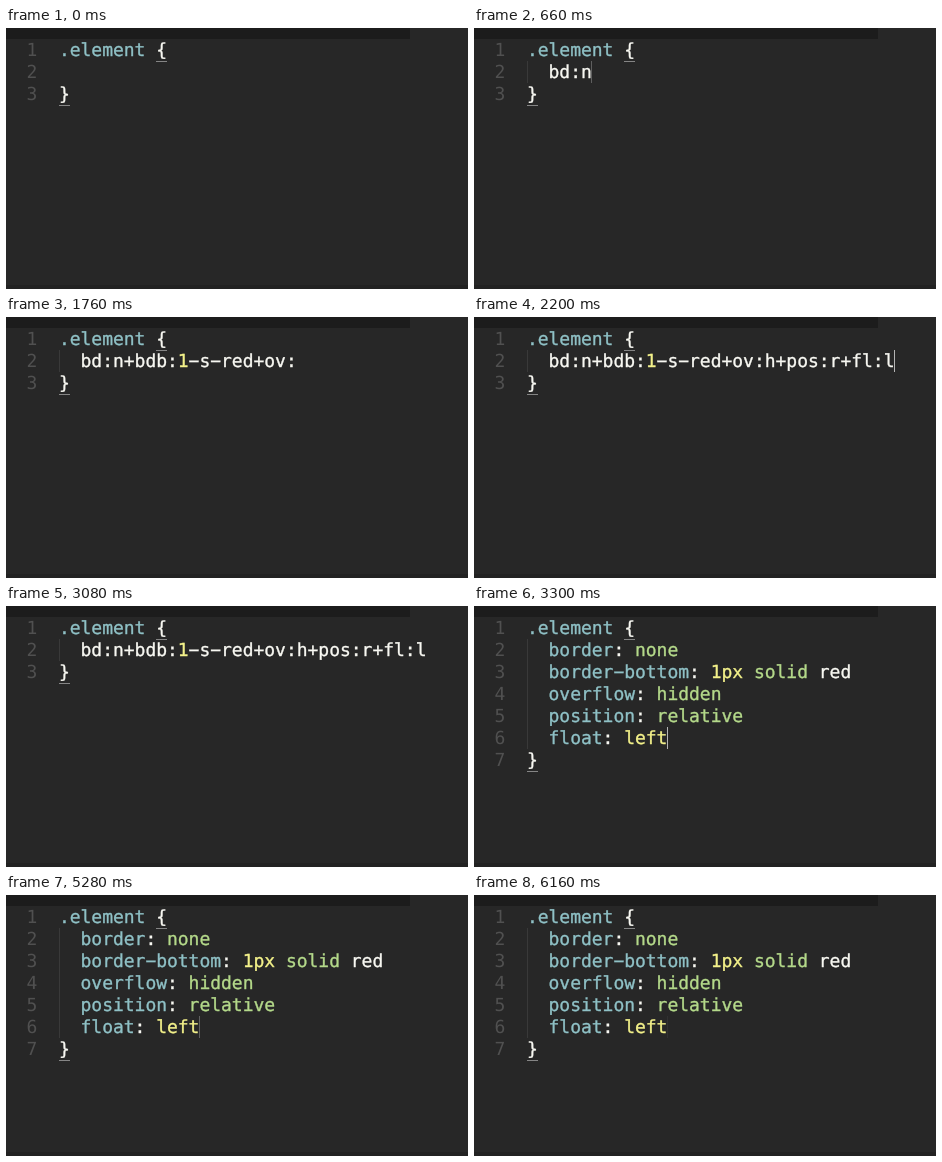
Write an HTML page with a canvas that moves like this. It is 462x261 px and loops after 6.38 s.

```html
<!DOCTYPE html>
<html lang="en">
<head>
<meta charset="utf-8">
<title>CSS abbreviation expanding in an editor</title>
<style>
html, body { margin: 0; width: 100%; height: 100%; overflow: hidden; background: #272727; }
canvas { display: block; width: 462px; height: 261px; }
</style>
</head>
<body>
<canvas id="stage" width="462" height="261"></canvas>
<script>
const ctx = document.getElementById("stage").getContext("2d");
const LOOP = 6380, LEFT = 52.9, ADVANCE = 10.81, LINE = 22, TOP = 11;
const C = {
  back: "#272727", bar: "#1c1c1c", foot: "#222222", gutter: "#505050",
  guide: "#393939", rule: "#858585", caret: "#b4b4b4",
  text: "#f8f8f2", key: "#8fc1c6", value: "#b4d98a", number: "#f3f18a"
};

// Abbreviation typed so far, by time
const typing = [
  [0, ""],
  [220, "bd:n"],
  [880, "bd:n+bdb:1-s-red+ov:"],
  [2200, "bd:n+bdb:1-s-red+ov:h+pos:r+fl:l"]
];
const EXPAND = 3300;
const rules = [
  ["border", ["none", C.value]],
  ["border-bottom", ["1px", C.number], ["solid", C.value], ["red", C.text]],
  ["overflow", ["hidden", C.value]],
  ["position", ["relative", C.value]],
  ["float", ["left", C.number]]
];

// Caret opacity steps
const caretSteps = [
  [0, 0], [220, 1], [440, 0.1], [660, 0.4], [880, 1], [1540, 0.15], [1760, 0],
  [2200, 1], [2640, 0.15], [2860, 0], [3300, 1], [3740, 0], [3960, 0.4],
  [4180, 1], [4840, 0.12], [5060, 0], [5280, 0.4], [5500, 1], [6160, 0.08]
];

function at(steps, t) {
  let value = steps[0][1];
  for (const [start, v] of steps) if (t >= start) value = v;
  return value;
}

function box(color, x, y, w, h) {
  ctx.fillStyle = color;
  ctx.fillRect(x, y, w, h);
}

function write(text, col, row, color, heavy = true) {
  ctx.fillStyle = ctx.strokeStyle = color;
  const y = TOP + row * LINE + 17;
  for (const ch of text.replace(/-/g, "\u2212")) {
    const x = LEFT + col++ * ADVANCE;
    ctx.fillText(ch, x, y);
    if (heavy) ctx.strokeText(ch, x, y);
  }
  return col;
}

function brace(ch, col, row) {
  write(ch, col, row, C.text);
  box(C.rule, Math.round(LEFT + col * ADVANCE), TOP + (row + 1) * LINE, 11, 1);
}

function drawRule(rule, row) {
  const [name, ...values] = rule;
  let col = write(name, 2, row, C.key);
  col = write(":", col, row, C.text);
  for (const [word, color] of values) col = write(word, col + 1, row, color);
  return col;
}

function drawAbbreviation(text) {
  let col = 2;
  for (const ch of text) col = write(ch, col, 1, ch === "1" ? C.number : C.text);
  return col;
}

function draw(t) {
  const expanded = t >= EXPAND;
  const inner = expanded ? rules.length : 1;
  const typed = at(typing, t);

  box(C.back, 0, 0, 462, 261);
  box(C.bar, 0, 0, 404, 11);
  box(C.foot, 0, 257, 462, 4);

  ctx.font = '18px "DejaVu Sans Mono", monospace';
  ctx.textRendering = "geometricPrecision";
  ctx.textBaseline = "alphabetic";
  ctx.lineWidth = 0.35;
  ctx.lineJoin = "round";

  for (let i = 0; i < inner + 2; i++) write(String(i + 1), -3, i, C.gutter, false);
  if (typed) box(C.guide, 53, TOP + LINE, 1, inner * LINE);

  write(".element", 0, 0, C.key);
  brace("{", 9, 0);
  let col = 0;
  if (expanded) rules.forEach((rule, i) => { col = drawRule(rule, i + 1); });
  else col = drawAbbreviation(typed);
  brace("}", 0, inner + 1);

  ctx.globalAlpha = at(caretSteps, t);
  box(C.caret, Math.floor(LEFT + col * ADVANCE), TOP + inner * LINE, 1, LINE);
  ctx.globalAlpha = 1;
}

const begin = performance.now();
function tick() {
  draw((performance.now() - begin) % LOOP);
  requestAnimationFrame(tick);
}
tick();
</script>
</body>
</html>
```
